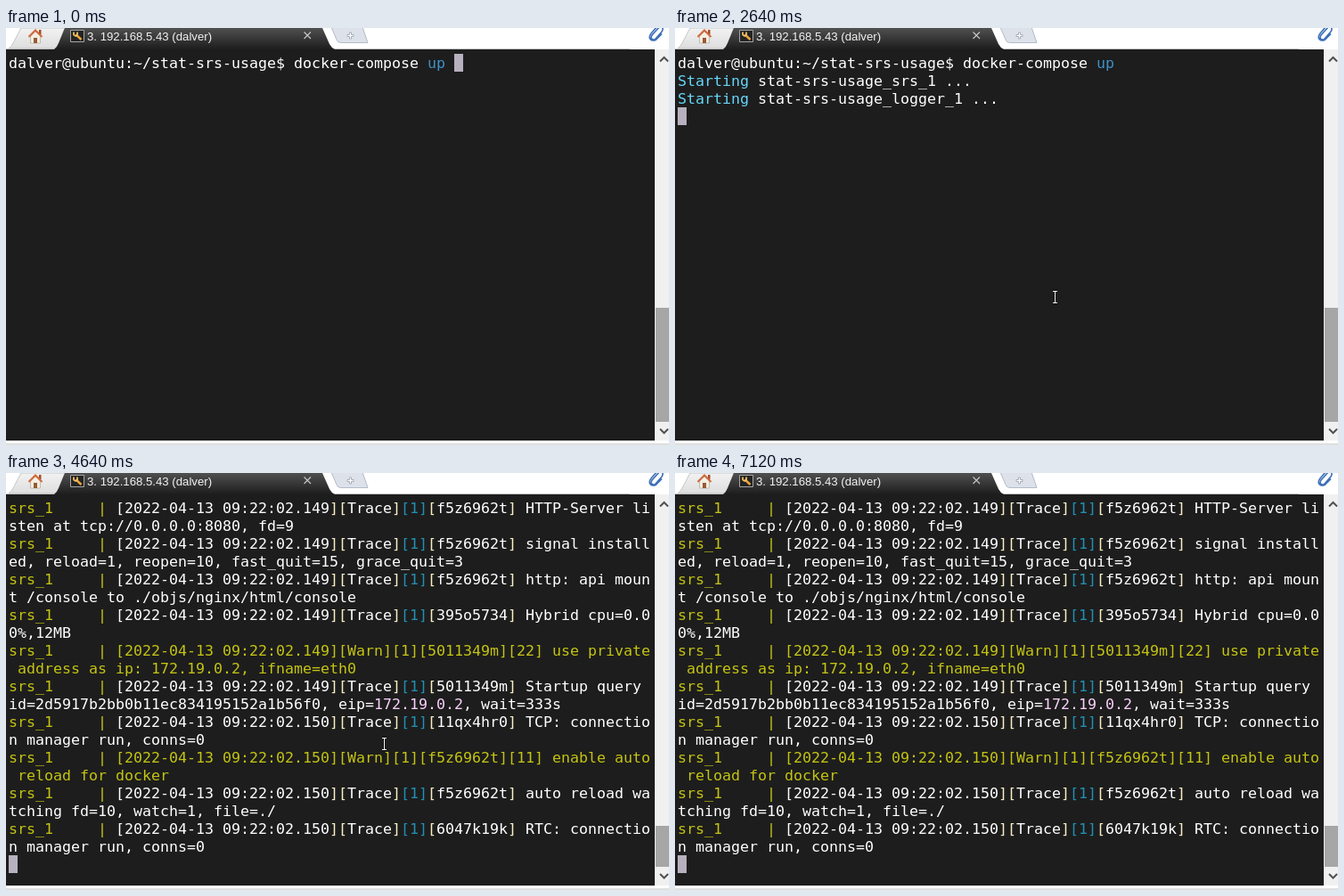
An HTML page for the animation above (8 s loop, 744 by 468 pixels).

```html
<!DOCTYPE html>
<html lang="en">
<head>
<meta charset="utf-8">
<title>Terminal session</title>
<style>
html, body { margin: 0; width: 100%; height: 100%; overflow: hidden; background: #fff; }
svg { position: absolute; left: 0; top: 0; }
#screen { position: absolute; left: 0; top: 24px; width: 728px; height: 439px; background: #1d1d1d; }
pre { position: absolute; left: 3px; top: 6px; margin: 0; color: #fff;
  font: 16.61px/20px "DejaVu Sans Mono", monospace; font-variant-ligatures: none; }
#caret { position: absolute; width: 10px; height: 20px; background: #b7b0be; }
.cmd { color: #4090c8; }
.start { color: #66d6f8; }
.done { color: #12b867; }
.warn { color: #c4c413; }
.mark { color: #fbefc4; }
.num { color: #2290b4; }
.ip { color: #fbd0fb; }
</style>
</head>
<body>
<div id="screen"><pre id="out"></pre><div id="caret"></div></div>
<svg width="744" height="468" viewBox="0 0 744 468">
  <defs>
    <linearGradient id="dark" x2="0" y2="1"><stop stop-color="#505050"/><stop offset="1" stop-color="#1d1d1d"/></linearGradient>
    <linearGradient id="pale" x2="0" y2="1"><stop stop-color="#f2f2f2"/><stop offset="1" stop-color="#dedede"/></linearGradient>
  </defs>
  <path d="M0 23.5H700" stroke="#c4c4c4"/>
  <!-- tabs -->
  <path d="M3 23Q6 21 8 17L17 0H66L57 23Z" fill="url(#pale)" stroke="#c6c6c6"/>
  <path d="M54 24Q57 22 59 17L66 0H355L363 18Q365 22 369 24Z" fill="url(#dark)"/>
  <path d="M365 -1L371 13Q372 16.500 376 16.500H406L400 -1Z" fill="#dde1ea" stroke="#b3bac8"/>
  <path d="M383 7.500h2.500v-2.500h2v2.500h2.500v2h-2.500v2.500h-2v-2.500h-2.500z" fill="#fff" stroke="#9a9fab" stroke-width=".8"/>
  <path d="M334.500 4.500l7.500 7.500m0-7.500l-7.500 7.500" stroke="#c8c8c8" stroke-width="1.100"/>
  <!-- house -->
  <path d="M37 2h2.500v5H37z" fill="#a34c2c"/>
  <path d="M27.500 9L33 4l5.500 5v8h-11z" fill="#f3eee2" stroke="#b5aa98" stroke-width=".7"/>
  <path d="M25.500 10L33 2.500l7.500 7.500" fill="none" stroke="#d2683a" stroke-width="2"/>
  <path d="M31 11h4v6h-4z" fill="#985b32"/>
  <!-- wrench -->
  <path d="M72.500 2.500h15v13h-15z" fill="#242424" stroke="#a5a5a5"/>
  <path d="M78.500 7.500l6 5.500" stroke="#eda63c" stroke-width="2.400"/>
  <path d="M76 4.500v3l2 1.500 2-1.500v-3" fill="none" stroke="#f5c566" stroke-width="1.700"/>
  <text x="91" y="14" font-size="13.200" font-family="Liberation Sans, Arial, sans-serif" fill="#f2f2f2">3. 192.168.5.43 (dalver)</text>
  <!-- paper clip -->
  <path d="M733 -1l-8 9q-2 3 0 4.500t4-.5l7-8q2-3 0-5M730 -1l-6 7q-3 4-1 6.500t6 1l7-7" fill="none" stroke="#3d6fb8" stroke-width="1.600"/>
  <!-- scroll bar -->
  <path d="M728 24h16v439h-16z" fill="#f0f0f0"/>
  <rect id="thumb" x="729" width="15" fill="#a6a6a6"/>
  <path d="M734 37.500l4.500-4.500 4.500 4.500M734 450l4.500 4.500 4.500-4.500" fill="none" stroke="#505050" stroke-width="2"/>
  <path d="M0 467h744" stroke="#c0c0c0"/>
  <g id="mouse">
    <circle id="click" r="15" fill="#ff0" fill-opacity=".47"/>
    <g fill="none"><path d="M-2.500-6.500h5M0-6.500v13M-2.500 6.500h5" stroke="#000" stroke-width="2.600"/>
    <path d="M-2.500-6.500h5M0-6.500v13M-2.500 6.500h5" stroke="#fff"/></g>
  </g>
</svg>
<script>
const $ = id => document.getElementById(id);
const tint = (kind, s) => `<span class="${kind}">${s}</span>`;

const prompt = "dalver@ubuntu:~/stat-srs-usage$ docker-compose " + tint("cmd", "up") + "\n";
const starting = name => tint("start", "Starting") + ` stat-srs-usage_${name}_1 ... `;
const stamp = ms => `[2022-04-13 09:22:02.${ms}`;
const head = "srs_1     | ";
const trace = (ms, id, msg) => tint("warn", head) + stamp(ms) + tint("mark", "][") + "Trace" +
  tint("mark", "]") + tint("num", "[1]") + tint("mark", "[") + id + tint("mark", "]") + ` ${msg}\n`;
const warn = (ms, id, code, msg) => tint("warn", `${head}${stamp(ms)}][Warn][1][${id}][${code}] ${msg}\n`);

const boot = prompt + starting("srs") + "\n" + starting("logger");
const logs =
  trace(149, "f5z6962t", "HTTP-Server li\nsten at tcp://0.0.0.0:8080, fd=9") +
  trace(149, "f5z6962t", "signal install\ned, reload=1, reopen=10, fast_quit=15, grace_quit=3") +
  trace(149, "f5z6962t", "http: api moun\nt /console to ./objs/nginx/html/console") +
  trace(149, "395o5734", "Hybrid cpu=0.0\n0%,12MB") +
  warn(149, "5011349m", 22, "use private\n address as ip: 172.19.0.2, ifname=eth0") +
  trace(149, "5011349m", "Startup query \nid=2d5917b2bb0b11ec834195152a1b56f0, eip=" + tint("ip", "172.19.0.2") + ", wait=333s") +
  trace(150, "11qx4hr0", "TCP: connectio\nn manager run, conns=0") +
  warn(150, "f5z6962t", 11, "enable auto\n reload for docker") +
  trace(150, "f5z6962t", "auto reload wa\ntching fd=10, watch=1, file=./") +
  trace(150, "6047k19k", "RTC: connectio\nn manager run, conns=0");

// start time, text, caret column and row, thumb top
const screens = [
  [0, prompt, 50, 0, 314],
  [1850, prompt, 0, 1, 314],
  [2640, boot, 0, 3, 314],
  [3500, boot + tint("done", "done"), 0, 3, 314],
  [3570, logs, 0, 20, 396],
];

// start time, pointer position; no position hides it
const moves = [
  [0], [110, 525, 390], [180, 456, 328], [240, 426, 302],
  [4640, 424, 304], [4710, 427, 310], [4780, 435, 323], [4840, 446, 338],
  [4910, 458, 353], [4980, 467, 364], [5050, 472, 370],
  [5380, 471, 371], [5450, 470, 372], [5580, 469, 373],
  [7050, 509, 395], [7120],
];

const at = (list, t) => list.findLast(step => step[0] <= t);
let shown;

function draw(now) {
  const t = now % 8000;
  const screen = at(screens, t);
  if (screen !== shown) {
    const [, text, col, row, top] = shown = screen;
    $("out").innerHTML = text;
    $("caret").style.left = 3 + col * 10 + "px";
    $("caret").style.top = 5 + row * 20 + "px";
    $("thumb").setAttribute("y", top);
    $("thumb").setAttribute("height", 442 - top);
  }
  const [, x, y] = at(moves, t);
  $("mouse").setAttribute("visibility", x ? "visible" : "hidden");
  if (x) $("mouse").setAttribute("transform", `translate(${x + .5} ${y})`);
  $("click").setAttribute("display", t >= 380 && t < 450 ? "inline" : "none");
  requestAnimationFrame(draw);
}
draw(performance.now());
</script>
</body>
</html>
```
